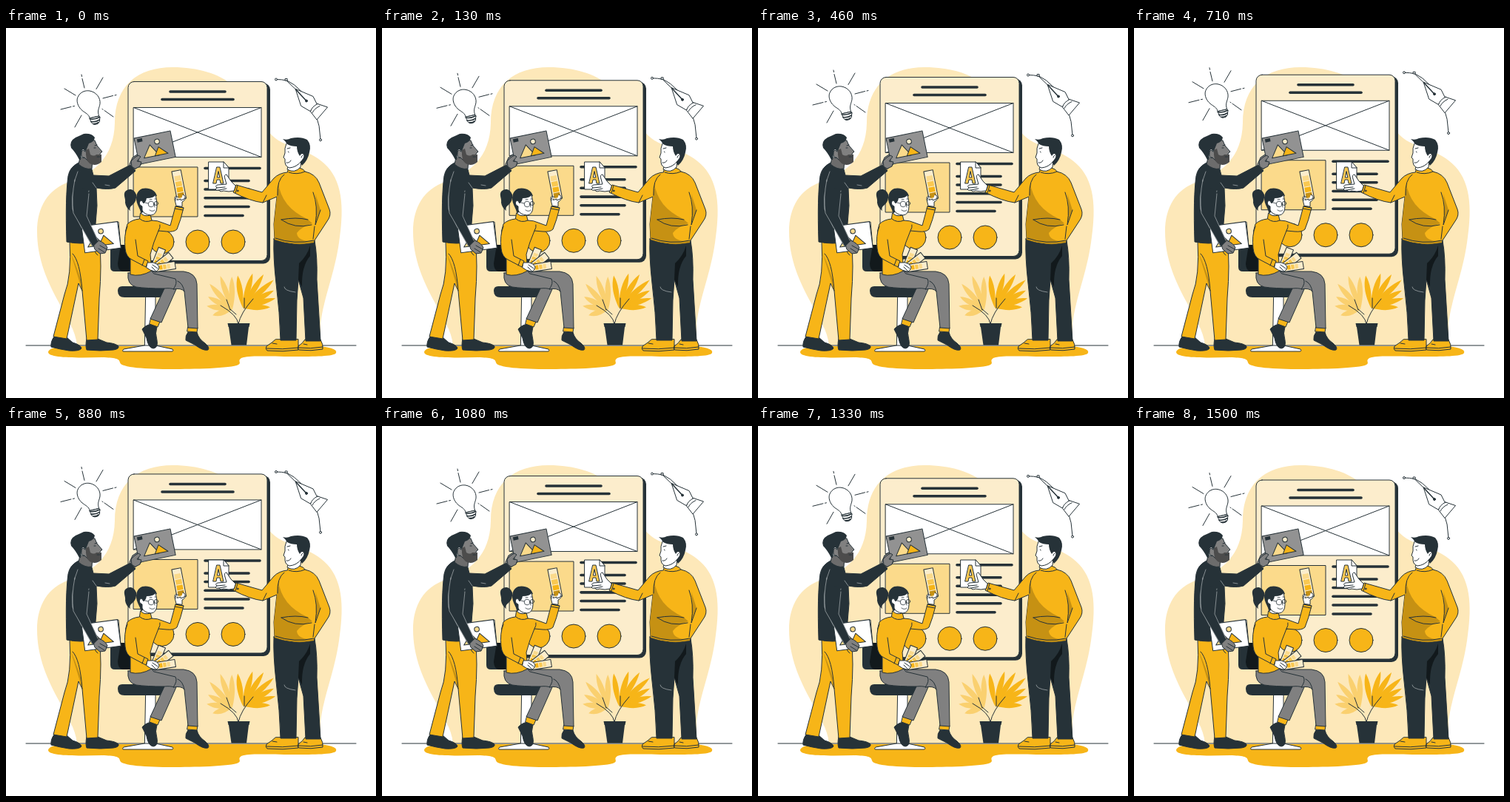
Write an HTML page that moves like this. It is 500 px wide and 500 px high and loops after 1540 ms.

```html
<!DOCTYPE html>
<html lang="en">
<head>
<meta charset="utf-8">
<title>Design team</title>
<style>
html, body { margin: 0; width: 100%; height: 100%; overflow: hidden; background: #fff; }
svg { display: block; width: 100vw; height: 100vh; }
.o { stroke: #263238; stroke-width: 1; stroke-linejoin: round; stroke-linecap: round; }
.n { fill: none; }
.y { fill: #f7b518; }
.d { fill: #263238; }
.w { fill: #fff; }
.g { fill: #808080; }
.c { fill: #fcedcc; }
.m { fill: #fbda8b; }
.s { fill: #c69113; }
.l { fill: none; stroke: #c5c9cb; stroke-width: .6; stroke-linecap: round; }
.bar { stroke: #263238; stroke-width: 3.6; stroke-linecap: round; }
</style>
</head>
<body>
<svg viewBox="0 0 500 500" xmlns="http://www.w3.org/2000/svg">
  <path fill="#fde8b9" d="M96 429C94 408 82 392 72 372C56 343 42 312 42 275C42 242 57 217 86 208C118 196 146 176 147 128C147 78 178 53 225 53C260 53 288 62 306 77C338 99 340 130 364 149C384 164 413 164 434 187C457 212 456 250 450 290C444 332 430 362 425 400V429Z"/>
  <path class="y" d="M57 438C58 431 76 430 95 430H420C440 431 448 435 446 439C444 444 415 444 390 444C350 444 330 442 318 446C312 450 319 452 314 455C305 460 250 461 225 461C190 461 155 459 154 452C153 446 147 446 130 445C95 446 57 446 57 438Z"/>
  <path class="o n" d="M27 429H473"/>

  <g id="float">
    <rect class="d" x="167" y="75" width="190" height="244" rx="9"/>
    <rect class="o c" x="165" y="73" width="188" height="242" rx="8"/>
    <rect class="o w" x="172.500" y="108" width="172.500" height="67"/>
    <path class="o n" d="M172.500 108L345 175M345 108L172.500 175"/>
    <rect class="o m" x="172.500" y="188.500" width="86.500" height="67"/>
    <g id="bars"></g>
    <g id="dots"></g>

    <g class="o n">
      <path d="M79 82.500L94 91.500M102 63.500L102.500 66M103 69L106 81.500M131 67.500L122 83M149 91L147 91.500M144.500 92L131 95.500M133 112L145 120.500M130 110L131 110.700M102 118.500L93 134.500M74 110.500L88 107M90.500 106.400L92.500 106"/>
      <path class="w" d="M113 122C112 117 108 116 103 112C96 106 95 98 97 94C100 87 107 84.500 113 85.500C122 87 128 95 127 103C126 109 123 112 125.500 119Z"/>
      <path class="w" d="M113 122.500L126 119.500Q128 121.500 126.500 123.500L126.500 127Q125 131 120 131Q115 130 114.500 126Z"/>
      <path stroke-width="1.600" d="M114 123.500Q120 124.500 126.500 121M115 127Q121 128 126.500 124.500M118 130Q122 130.500 125 128"/>
    </g>

    <g class="o n">
      <path d="M365 70Q373 70 379 71.500L392 84M379 71Q390 76 400 87Q424 113 425 151"/>
      <path class="w" d="M391.500 83L415 93L420.500 104L411 113L399 106Z"/>
      <path class="w" d="M421 103L434.500 107.500L420 124.500L411.500 113.500Q413 107 421 103ZM414 115Q417 109 424 106"/>
      <path stroke-width="1.500" d="M392 84L405 98"/>
      <circle class="d" cx="406" cy="99" r="1.500"/>
      <circle class="w" cx="365" cy="70" r="1.500"/>
      <circle class="w" cx="425" cy="151.800" r="1.500"/>
      <rect class="w" x="377.500" y="69" width="2.600" height="2.600"/>
    </g>
  </g>

  <g id="plant">
    <g id="fans"></g>
    <path class="o n" d="M314 400Q313 388 290 375M314 400Q317 385 334 366M303 381L298 367M322 379V365M311 387L303 380"/>
    <path class="d" d="M299.500 399H329.500L328.500 404H328L325 428.500H304.500L301 404H300.500Z"/>
  </g>

  <g id="chair">
    <path class="o w" d="M189 363H202V429L225 434Q227 437 224 437H159Q156 437 159 434L187 429Z"/>
    <path class="o n" d="M187 429H202"/>
    <path class="d" d="M145 293H168V329H147Q141 329 141 323V298Q141 293 145 293Z"/>
    <path fill="#12191c" d="M155 293H169V329H158Q151 328 151 318Z"/>
    <path class="d" d="M157 349H212Q217 349 217 354Q216 364 207 364H160Q151 364 151 355Q151 349 157 349Z"/>
  </g>

  <g id="woman">
    <path class="d o" d="M196 400L204 404Q201 412 204 422Q206 432 199 433Q192 432 190 419L184 407Q188 402 196 400Z"/>
    <path class="d o" d="M246 411H258Q260 420 269 426Q276 432 273 435Q267 437 255 428L243 422Q242 416 246 411Z"/>
    <path class="y o" d="M196 392L208 397L205 404L194 400ZM246 404L259 405L258 411L245 410Z"/>
    <path class="g o" d="M165 331L200 328Q222 327 231 337Q237 344 230 353L210 398L195 393L214 352Q190 352 176 350Q163 347 165 331Z"/>
    <path class="g o" d="M198 329L240 329Q257 331 258 346L259 406L246 405L241 356Q237 351 226 353Q232 345 229 339L200 332Z"/>
    <path class="o n" d="M241 356Q239 345 232 342M214 352Q223 351 227 353"/>
    <path class="y o" d="M182 250L195 252L197 260Q205 260 211 263L222 267L229 241L240 243Q236 260 231 272Q227 276 217 275L206 274Q199 290 195 306L197 328Q181 337 168 333L168 308Q157 282 164 265Q170 259 180 258Z"/>
    <path class="o n" d="M181 258Q188 264 197 260M206 274Q209 269 208 266M229 241L240 243M228 244L239 246"/>
    <path class="w o" d="M182 247L183 251Q187 255 195 253L195 247Z"/>
    <path class="d" d="M178 239C174 230 176 220 184 217C193 215 202 219 204 227L192 230L189 247L183 250Z"/>
    <path class="d" d="M176 225C173 217 166 216 161 221C158 226 162 230 161 236Q162 243 168 247Q166 242 171 239Q177 234 176 225Z"/>
    <path class="w o" d="M187 227Q194 225 202 225Q204 233 204 241Q204 252 196 253Q186 252 184 246L184 241Q179 239 181 234Q184 232 186 236Z"/>
    <path class="d" d="M185 237L185 228Q192 222 203 225Q200 230 190 230Q189 236 185 237Z"/>
    <g class="o n" style="stroke-width:.8"><circle cx="196" cy="238" r="3.800"/><circle cx="203" cy="237" r="2.600"/><path d="M192 237L184 235M194 246Q198 249 201 246M200 237L201 242M194 232L197 231.500M201 231L203 231"/></g>
    <path class="w o" d="M230 240L228 232Q227 228 231 226L235 224L242 227Q244 232 238 235L238 241Z"/>
    <g id="held" transform="rotate(-11 234 212)"></g>
    <path class="w o" d="M229 233Q228 228 233 228M239 225Q244 227 241 231L236 233"/>
    <g id="fan"></g>
    <path class="w o" d="M191 317L199 317Q205 318 207 323Q206 329 201 329Q195 328 190 324Z"/>
    <path class="o n" d="M198 320L205 325M197 323L202 328"/>
    <path class="y o" d="M164 268Q159 280 161 298Q162 309 170 313L189 323L192 315L178 308L175 286"/>
    <path class="o n" d="M187 313L184 321"/>
  </g>

  <g id="presenter">
    <path class="d o" d="M65 417Q60 424 61 431Q72 434 85 436Q99 437 102 433Q101 428 90 425L82 418ZM109 420Q107 429 109 435Q128 437 145 435Q153 434 152 430Q148 426 136 425L124 420Z"/>
    <path class="y o" d="M86 287H126Q130 318 126 365L124 421L109 422L103 355L98 345L82 420L64 417L79 360Q89 335 86 287Z"/>
    <path class="s" d="M88 306Q94 318 101 340L103 355L96 332Z"/>
    <path class="o n" d="M90 305Q100 315 103 355M118 292Q119 304 124 307"/>
    <path class="d o" d="M98 182Q86 188 84 200Q80 228 82 289Q101 293 119 289L123 240L122 216Q138 219 148 216L175 193L168 185L139 200L118 199L115 187Z"/>
    <path fill="#6c6c6c" class="o" d="M100 175L98 184Q107 192 116 190L117 178Z"/>
    <path class="g o" d="M103 158Q108 149 120 152L123 159L130 167L127 170L128 180Q121 186 113 182L106 175Q101 176 102 168Q103 163 107 167Z"/>
    <path fill="#4c4c4c" d="M108 165L112 163L114 171Q119 174 122 171L129 171L129 181Q121 188 113 183Q107 179 108 165Z"/>
    <path class="d" d="M99 178Q94 168 88 162Q85 153 94 148Q101 145 105 143Q116 142 120 148Q119 154 112 156L108 166Q102 161 102 170L101 178Z"/>
    <path class="o n" d="M120 159L123 158M119 162L121 162M123 174L127 174"/>
    <path class="l" d="M97 194Q88 215 90 245L104 274M122 216L117 209M104 240Q111 229 112 220M140 213L134 212"/>
    <path class="g o" d="M167 184L171 175L177 171L181 173L178 178L184 178L183 184L174 191Z"/>
    <g id="photo" transform="translate(173 149) rotate(-11.500)">
      <rect class="o" fill="#929292" width="50" height="36"/>
      <rect class="d" x="3.500" y="2" width="7" height="4.500"/>
      <circle class="o c" cx="29.500" cy="10.500" r="3.300"/>
      <path class="o m" d="M8 29L19 13L29 29Z"/>
      <path class="o y" d="M23 29L30 18L41 29Z"/>
    </g>
    <path class="g o" d="M170 187L169 180Q174 174 179 172L182 174L177 180L183 181L181 187L175 190Z"/>
    <path class="w o" d="M105 270L152 262L155 295L108 303Z"/>
    <g transform="translate(102 268) rotate(-7.500)">
      <rect class="o w" width="49" height="36"/>
      <circle class="o m" cx="25" cy="10" r="3.300"/>
      <path class="o m" d="M5 29L16 15L27 29Z"/>
      <path class="o y" d="M20 29L28 16L40 29Z"/>
    </g>
    <path class="g o" d="M118 289L125 287Q135 291 137 297L134 304L127 305L120 299Z"/>
    <path class="o n" d="M127 294L136 299M125 298L133 303"/>
    <path class="d" d="M89 205L91 250L117 296L125 288L109 254L112 222Z"/>
    <path class="l" d="M93 205Q88 230 91 250L117 295M112 224L109 254L124 287"/>
  </g>

  <g id="holder">
    <path class="y o" d="M364 421Q360 425 352 430Q350 434 353 436Q374 438 395 435L395 421ZM404 421Q401 426 395 430Q393 434 396 435Q412 437 428 434Q429 428 425 421Z"/>
    <path class="o n" d="M352 433Q374 435 395 432M395 432Q412 434 428 431M360 426L366 427M402 427L407 428"/>
    <path class="d o" d="M362 285L417 287Q421 310 420 340L425 423L405 423L402 365L395 340L393 368L392 422L371 422Q370 385 365 345Q361 310 362 285Z"/>
    <path fill="#12191c" d="M411 294Q407 308 396 318L395 340L400 350Q399 322 411 308Z"/>
    <path class="l" d="M376 350Q376 355 391 357"/>
    <path class="y o" d="M382 189Q401 187 404 194Q418 197 423 209L437 245Q440 253 434 261L417 287L416 290Q390 296 363 286L362 265L366 228L347 236Q330 234 307 222L311 212L346 222L362 203Q369 196 380 195Z"/>
    <path class="s" d="M368 209Q372 242 407 258L414 264Q400 268 393 277Q394 289 416 288L416 290Q390 295 363 286L362 265L366 228ZM418 224L425 246L418 263Q421 244 418 224Z"/>
    <path class="o n" d="M347 236L352 226M376 198Q366 205 367 226M372 259Q390 272 413 266M372 259Q392 255 408 259M415 222Q422 240 418 266L425 246M417 268L415 285M364 284Q390 293 416 287M313 213L310 223M382 195Q393 199 404 194"/>
    <path class="w o" d="M382 184L380 191Q390 197 398 188L399 177Z"/>
    <path class="w o" d="M379 156Q376 163 377 169L375 175L377 177Q376 187 383 189Q393 188 399 180Q404 177 403 171L398 168L396 156Z"/>
    <path class="d" d="M374 150Q380 152 385 149Q398 146 407 151Q413 158 410 168Q408 179 400 186L398 182L400 178Q404 174 402 170Q399 169 397 173Q393 167 393 160Q385 160 380 157Q378 153 374 150Z"/>
    <path class="o n" d="M380 163L384 162M381.500 167L382 168M379 182Q383 183 385 179M401 172Q399 173 399 175"/>
    <path class="o w" d="M274 181H294L301 189V218H274Z"/>
    <path class="o w" d="M294 181V189H301Z"/>
    <path class="o" fill="#f9c851" fill-rule="evenodd" d="M285 188H289L294 210H290L289 205H285L284 210H280ZM287 194L285.500 202H288.500Z"/>
    <path class="w o" d="M310 213L304 207L298 198Q294 198 296 204L298 211L286 212Q282 213 285 216L283 218Q284 220 288 219Q289 222 294 220Q301 222 308 220Z"/>
    <path class="o n" d="M285 216L296 215M288 219L298 217"/>
    <circle class="o n" cx="313" cy="220" r="1"/>
  </g>
</svg>
<script>
const $ = id => document.getElementById(id);
const LOOP = 1540, PEAK = 1500, RISE = 10;

// Heading and paragraph bars: x1, x2, y
$('bars').innerHTML = [
  [222, 296, 86.5], [211, 307, 97], [269, 343, 190], [269, 328, 207],
  [269, 328, 218.5], [269, 328, 230.3], [269, 328, 242], [269, 320, 254]
].map(([a, b, y]) => `<path class="bar" d="M${a} ${y}H${b}"/>`).join('');

$('dots').innerHTML = [211, 259, 307]
  .map(x => `<circle class="o y" cx="${x}" cy="289.500" r="16"/>`).join('');

function leaf(x, y, deg, len, fill) {
  return `<path fill="${fill}" transform="translate(${x} ${y}) rotate(${deg})" ` +
    `d="M0 0Q${len * .6} -8 ${len} 0Q${len * .6} 7 0 0"/>`;
}
// Leaves: angle, length
const fanLeft = [[163, 28], [187, 35], [207, 37], [228, 46], [250, 48], [269, 44]];
const fanRight = [[261, 44], [286, 48], [302, 53], [318, 56], [331, 48], [344, 46], [359, 37]];
$('fans').innerHTML =
  fanLeft.map(([a, l]) => leaf(306, 380, a, l, '#fad06f')).join('') +
  fanRight.map(([a, l]) => leaf(320, 378, a, l, '#f7b518')).join('');

// Colour sample strip with four chips
function strip(x, y, w, h) {
  const tones = ['#fbda8b', '#f9c851', '#f7b518', '#c69113'], step = (h - 8) / 4;
  return `<rect class="o c" x="${x}" y="${y}" width="${w}" height="${h}"/>` + tones.map((c, i) =>
    `<rect x="${x + 2}" y="${y + 7 + i * step}" width="${w - 4}" height="${step - 1}" fill="${c}"/>`).join('');
}
$('held').innerHTML = strip(227.5, 192.5, 12.5, 39);
$('fan').innerHTML = [22, 52, 81]
  .map(a => `<g transform="translate(200 325) rotate(${a})">${strip(-5, -29, 10, 29)}</g>`).join('');

function draw(now) {
  const p = ((now - PEAK + LOOP) % LOOP + LOOP) % LOOP / LOOP;
  const lift = RISE * (1 - Math.abs(1 - 2 * p));
  $('float').setAttribute('transform', `translate(0 ${-lift.toFixed(3)})`);
}

let start;
function tick(now) {
  start ??= now;
  draw(now - start);
  requestAnimationFrame(tick);
}
draw(0);
requestAnimationFrame(tick);
</script>
</body>
</html>
```
